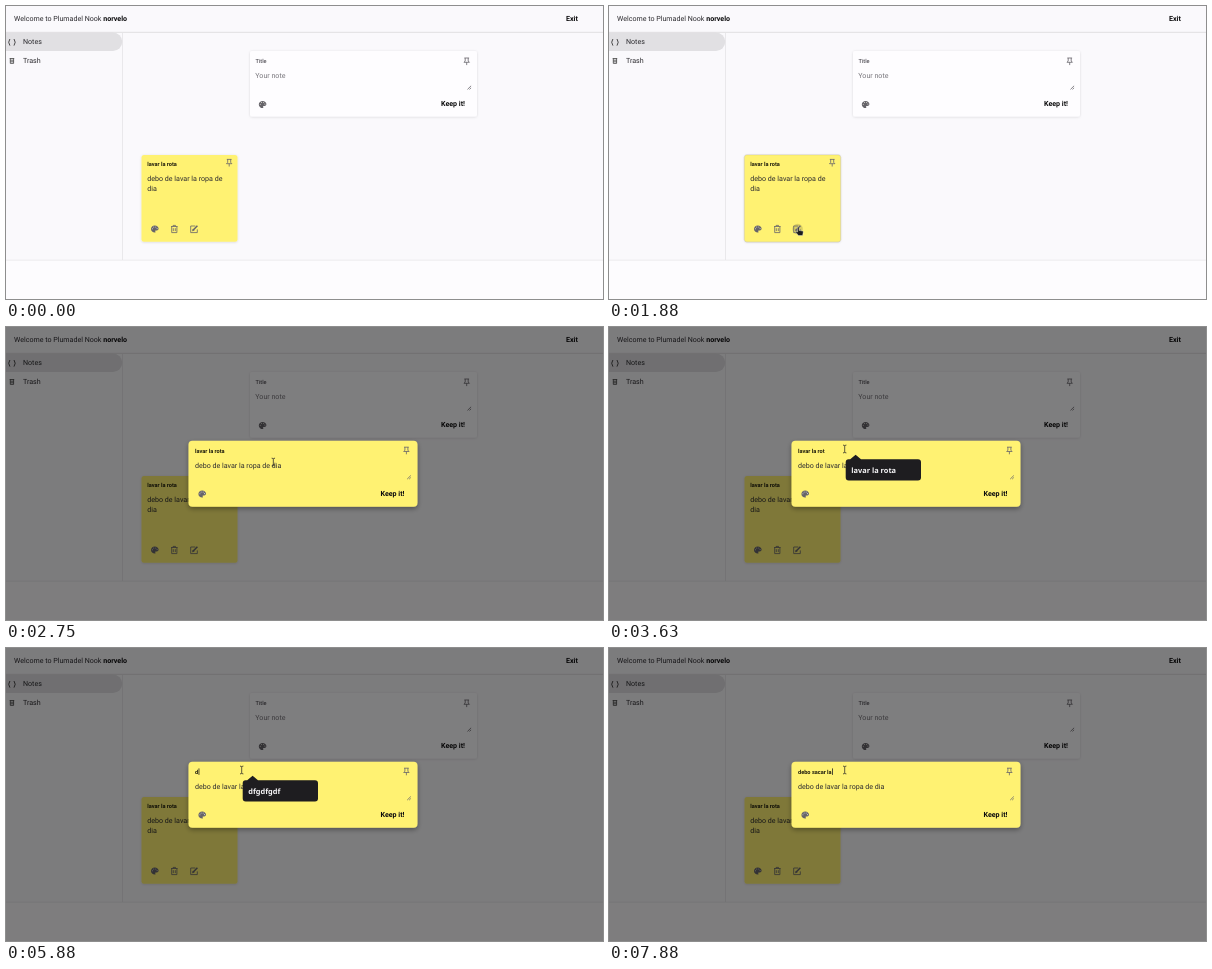
An HTML page for the animation above (8000 ms loop, 597 by 293 pixels).

```html
<!DOCTYPE html>
<html lang="es">
<head>
<meta charset="utf-8">
<title>Notes</title>
<style>
  html, body { margin: 0; width: 100%; height: 100%; overflow: hidden; background: #faf9fc; }
  svg { display: block; width: 597px; height: 293px; }
  text { font: 7.1px Roboto, sans-serif; fill: #2c2b2f; white-space: pre; text-rendering: geometricPrecision; }
  .bold { font-weight: 700; fill: #0c0c0d; }
  .title { font-size: 5.6px; font-weight: 700; fill: #1d1b0c; }
  .hint { fill: #78767c; }
  .label { font-size: 5.6px; font-weight: 500; fill: #55535a; }
  .tip { font: 600 7.4px "Noto Sans", sans-serif; fill: #f5f4f6; }
  .line { fill: none; stroke: #66646a; stroke-width: .8; }
</style>
</head>
<body>
<svg viewBox="0 0 597 293" xmlns="http://www.w3.org/2000/svg">
  <defs>
    <filter id="soft" x="-10%" y="-10%" width="120%" height="130%">
      <feDropShadow dx="0" dy=".5" stdDeviation=".8" flood-opacity=".14"/>
    </filter>
    <filter id="deep" x="-10%" y="-15%" width="120%" height="140%">
      <feDropShadow dx="0" dy="2" stdDeviation="2.5" flood-opacity=".35"/>
    </filter>
    <g id="palette">
      <path fill="#66646a" fill-rule="evenodd" d="M0-3.6C-2.2-3.6-3.8-2-3.8 0S-2.1 3.6 0 3.6C.9 3.6 .8 2.8 .5 2.4C.2 1.8 .6 1.4 1.2 1.4H2C3.2 1.4 3.8 .6 3.8-.4C3.8-2.3 2.1-3.6 0-3.6Z"/>
      <g fill="#d9d6cf">
        <circle cx="-2.3" cy="-.3" r=".55"/><circle cx="-1.1" cy="-2" r=".55"/>
        <circle cx="1" cy="-2" r=".55"/><circle cx="2.3" cy="-.4" r=".55"/>
      </g>
    </g>
    <path id="pin" class="line" d="M-2.4-3.2H2.4M-1.5-3.2V-.2L-2.7 1.1H2.7L1.5-.2V-3.2M0 1.1V3.9"/>
    <path id="grip" class="line" stroke-width=".6" d="M-1.8 1.8L1.8-1.8M.2 1.8L1.8 .2"/>
    <path id="bin" class="line" d="M-3.3-2.5H3.3M-1.2-2.6V-3.6H1.2V-2.6M-2.6-2.5V3.6H2.6V-2.5M-1-.8V2.1M1-.8V2.1"/>
    <g id="edit" class="line">
      <path d="M1-3H-3.6V3.6H3V.4"/>
      <path stroke-width="1.5" d="M-1.3 1.2L3.1-3.2"/>
      <path stroke-width=".7" d="M-1.9 1.9L-1.2-.1M-1.9 1.9L.2 1.2"/>
    </g>
  </defs>

  <rect width="597" height="293" fill="#faf9fc"/>
  <rect y="254" width="597" height="39" fill="#fdfcfe"/>
  <rect y="25.8" width="597" height="1" fill="#e0dfe2"/>
  <rect y="253.7" width="597" height=".8" fill="#e8e7ea"/>
  <rect x="116" y="27" width=".8" height="227" fill="#e5e4e7"/>
  <path d="M0 26.5H107A9.25 9.25 0 0 1 107 45H0Z" fill="#e1e0e3"/>

  <text x="8" y="15">Welcome to Plumadel Nook <tspan class="bold">norvelo</tspan></text>
  <text class="bold" x="560" y="15">Exit</text>
  <path class="line" style="stroke:#222" d="M3.9 33Q1.5 36.2 3.9 39.6M8 33Q10.4 36.2 8 39.6"/>
  <text x="17" y="38">Notes</text>
  <path class="line" style="stroke:#444" d="M3.7 52.5H8.2M4.3 52.5V57.4H7.6V52.5M4.3 54.2H7.6M4.3 55.8H7.6"/>
  <text x="17" y="57">Trash</text>

  <rect x="244" y="45" width="227" height="65.5" rx="2" fill="#fefdff" filter="url(#soft)"/>
  <text class="label" x="249.5" y="57">Title</text>
  <text class="hint" x="249.3" y="72.4">Your note</text>
  <use href="#pin" x="460.7" y="55.2"/>
  <use href="#grip" x="463.3" y="81.6"/>
  <use href="#palette" x="256.6" y="98.5"/>
  <text class="bold" x="435" y="99.8">Keep it!</text>

  <rect x="135.5" y="149" width="96" height="86.7" rx="2.5" fill="#fff272" filter="url(#soft)"/>
  <rect id="hover" x="135.3" y="148.8" width="96.4" height="87.2" rx="2.5" fill="none" stroke="#8a8340" stroke-opacity=".3" stroke-width=".7"/>
  <text class="title" x="141.3" y="159.6">lavar la rota</text>
  <text x="141.3" y="175.3">debo de lavar la ropa de</text>
  <text x="141.3" y="184.7">dia</text>
  <use href="#pin" x="223.2" y="156.6"/>
  <use href="#palette" x="148.8" y="223"/>
  <use href="#bin" x="168.3" y="223"/>
  <circle id="halo" cx="188.6" cy="223" r="5.2" fill="#807a40" fill-opacity=".3"/>
  <use href="#edit" x="188.3" y="223"/>

  <g id="modal">
    <rect width="597" height="293" fill="#000" fill-opacity=".5"/>
    <rect x="182.5" y="113.7" width="229" height="66" rx="4" fill="#fff272" filter="url(#deep)"/>
    <text id="name" class="title" x="189" y="125.6"></text>
    <text id="blank" class="label" x="189" y="125.6">Title</text>
    <rect id="caret" y="120.4" width=".8" height="6.5" fill="#222"/>
    <text x="189" y="140.5">debo de lavar la ropa de dia</text>
    <use href="#pin" x="400.4" y="123.4"/>
    <use href="#grip" x="403" y="150.3"/>
    <use href="#palette" x="196.2" y="167"/>
    <text class="bold" x="374.5" y="168.6">Keep it!</text>
    <g id="tip">
      <path fill="#1e1d20" d="M240 132.3H241.2L246.6 127.8L252 132.3H309A3 3 0 0 1 312 135.3V150.5A3 3 0 0 1 309 153.5H239.7A3 3 0 0 1 236.7 150.5V135.3A3 3 0 0 1 239.7 132.3Z"/>
      <text id="hit" class="tip" x="242.3" y="145.6"></text>
    </g>
  </g>

  <g id="mouse">
    <path id="arrow" d="M0 0V8L1.9 6.3L3.2 9L4.4 8.4L3.2 5.8H5.7Z" fill="#111" stroke="#f4f4f4" stroke-width=".6"/>
    <path id="hand" d="M0 .4Q.8-.5 1.5 .4V3.4L5 4.1Q5.8 4.4 5.6 5.3L5 8.5H.8L-1.8 5.2Q-1.6 4.1-.7 4.4L0 5Z" fill="#1b1b1d" stroke="#eee" stroke-width=".4"/>
    <path id="beam" class="line" style="stroke:#34322a" d="M-1.7-3.9Q0-3.9 0-3Q0-3.9 1.7-3.9M0-3V3M-1.7 3.9Q0 3.9 0 3Q0 3.9 1.7 3.9"/>
  </g>
</svg>
<script>
const LOOP = 8000;
const el = {};
document.querySelectorAll("[id]").forEach(n => el[n.id] = n);

const OLD = "lavar la rota", NEW = "debo sacar la";
// [time, letters left]
const erased = [[0, 13], [3630, 12], [3750, 11], [4000, 10], [4130, 9], [4250, 8],
  [4380, 7], [4500, 6], [4630, 5], [4750, 3], [4880, 1], [5000, 0]];
// [time, letters typed]
const typed = [[5880, 1], [6130, 2], [6500, 3], [6750, 4], [6880, 5], [7000, 7],
  [7130, 9], [7250, 10], [7500, 11], [7630, 12], [7880, 13]];
// [time, x, y]
const path = [[130, 400, 190], [880, 226, 212], [1700, 189, 221], [2130, 188, 221],
  [2650, 272, 137], [3100, 235.7, 122]];

const show = (node, on) => node.setAttribute("visibility", on ? "inherit" : "hidden");
const within = (t, a, b) => t >= a && t < b;
const stepAt = (list, t) => list.reduce((v, [at, n]) => t >= at ? n : v, 0);
const ease = u => u * u * (3 - 2 * u);

function mouseAt(t) {
  const i = path.findIndex(p => p[0] > t);
  if (i < 0) return path[path.length - 1].slice(1);
  if (i === 0) return path[0].slice(1);
  const [t0, x0, y0] = path[i - 1], [t1, x1, y1] = path[i];
  const u = ease((t - t0) / (t1 - t0));
  return [x0 + (x1 - x0) * u, y0 + (y1 - y0) * u];
}

function caretOn(t) {
  if (t < 5000) return within(t, 3130, 3380);
  if (t < 5880) return within(t, 5250, 5630);
  return true;
}

function draw(t) {
  const open = t >= 2000;
  const [x, y] = mouseAt(t);
  const onCard = !open && x < 231 && y > 149;
  const onEdit = !open && t >= 1500;
  const onField = open && y < 179;

  show(el.modal, open);
  show(el.hover, onCard);
  show(el.halo, onEdit);
  show(el.mouse, t >= 130);
  show(el.arrow, !onEdit && !onField);
  show(el.hand, onEdit);
  show(el.beam, onField);
  el.mouse.setAttribute("transform", `translate(${x} ${y})`);

  const value = t < 5880 ? OLD.slice(0, stepAt(erased, t)) : NEW.slice(0, stepAt(typed, t));
  el.name.textContent = value;
  show(el.blank, open && !value);
  show(el.caret, open && caretOn(t));
  el.caret.setAttribute("x", 189.4 + (value ? el.name.getComputedTextLength() : 0));

  const first = within(t, 3630, 5250);
  show(el.tip, first || within(t, 5880, 6130));
  el.hit.textContent = first ? OLD : "dfgdfgdf";

  // children set to "inherit" follow the dialog's own visibility
  if (!open) [el.blank, el.caret, el.tip].forEach(n => show(n, false));
}

const start = performance.now();
function tick() {
  draw((performance.now() - start) % LOOP);
  requestAnimationFrame(tick);
}
tick();
</script>
</body>
</html>
```
